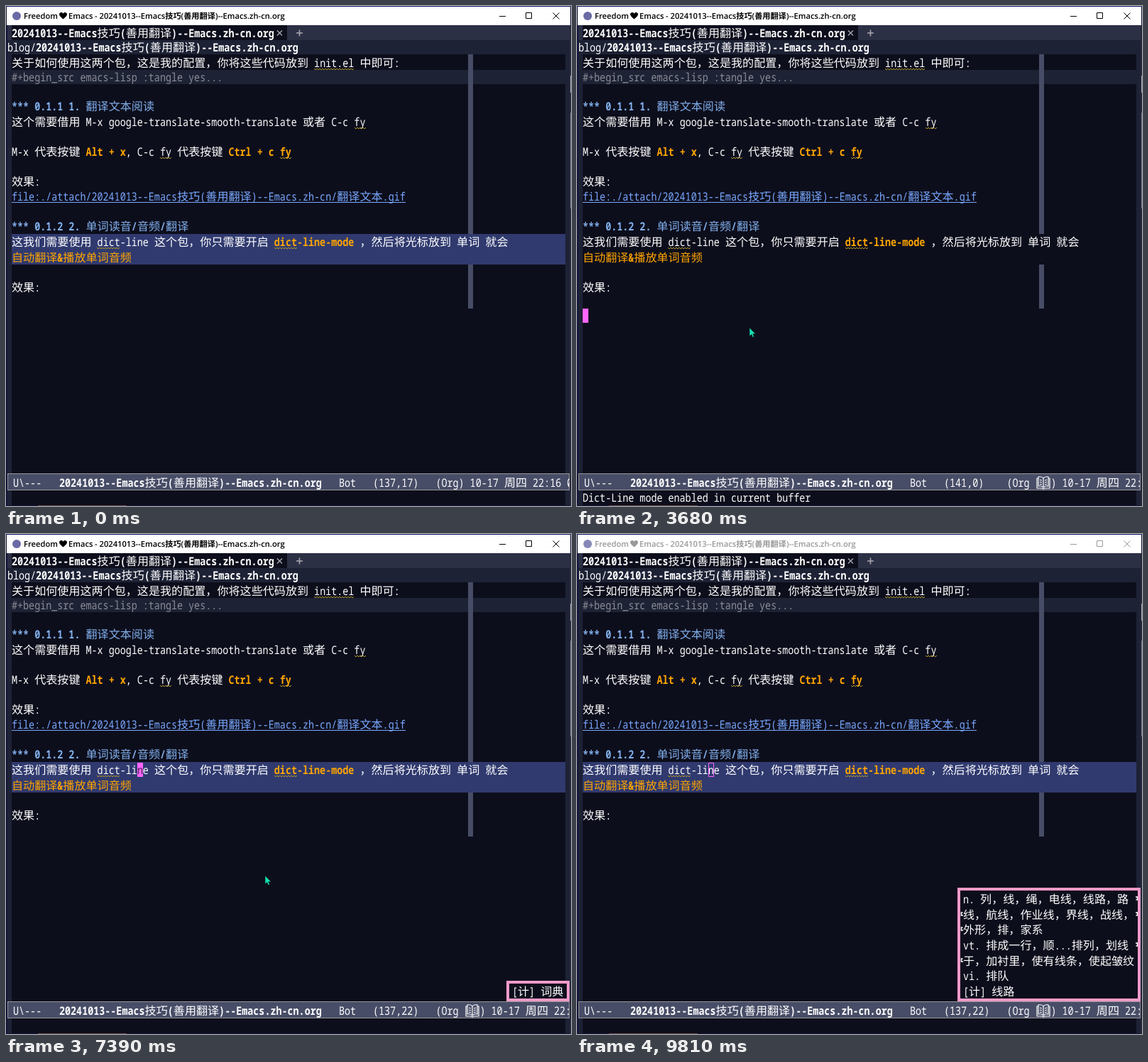
Animation of 796x704 px, one loop 9.84 s. Source, as an HTML page:

```html
<!DOCTYPE html>
<html lang="zh-CN">
<head>
<meta charset="utf-8">
<title>Emacs dict-line</title>
<style>
html, body { margin: 0; width: 100%; height: 100%; overflow: hidden; background: #0d0e1c; }
svg { display: block; }
text { white-space: pre; text-rendering: geometricPrecision; }
.m { font: 13.4px "Noto Sans Mono", "DejaVu Sans Mono", monospace; }
.c { font: 16.08px "Noto Sans CJK SC", "Noto Sans CJK", sans-serif; }
.m.b { font-weight: 700; }
.c.b { font-weight: 500; }
.t { font: 600 11.2px "Open Sans", "Noto Sans CJK SC", "Noto Sans CJK", sans-serif; }
</style>
</head>
<body>
<svg width="796" height="704" viewBox="0 0 796 704">
  <defs>
    <clipPath id="body"><rect x="0" y="0" width="788" height="704"/></clipPath>
    <clipPath id="frame"><rect x="2" y="0" width="792" height="704"/></clipPath>
  </defs>
  <g id="back"></g>
  <g id="live"></g>
  <g id="mouse"></g>
</svg>
<script>
const LOOP = 9840, COL = 8.04, LEFT = 8;
const BG = '#0d0e1c', DIM = '#1d2235', WHITE = '#ffffff', PINK = '#ff66ff', ORANGE = '#ffa500',
  HEAD = '#82b0ec', LINK = '#79a8ff', BAR = '#484d67', NOTE = '#9ac8e0', POP = '#ee9ac8', MINT = '#16e0b4';
const FILE = '20241013--Emacs技巧(善用翻译)--Emacs.zh-cn.org';
const CJK = /[\u3000-\u9fff\uff00-\uffef]+|[^\u3000-\u9fff\uff00-\uffef]+/g;
const $ = id => document.getElementById(id);

const rect = (x, y, x2, y2, fill, more = '') =>
  `<rect x="${x}" y="${y}" width="${x2 - x}" height="${y2 - y}" fill="${fill}" ${more}/>`;
const box = (x, y, x2, y2, stroke, w = 1) =>
  rect(x + w / 2, y + w / 2, x2 - w / 2, y2 - w / 2, 'none', `stroke="${stroke}" stroke-width="${w}"`);
const path = (d, stroke, more = '') => `<path d="${d}" fill="none" stroke="${stroke}" ${more}/>`;
const esc = s => s.replace(/&/g, '&amp;').replace(/</g, '&lt;');

// Text on the terminal grid: wide characters take two columns. y is the row's middle.
function put(x, y, str, color = WHITE, bold = false) {
  let out = '';
  for (const run of str.match(CJK) || []) {
    const wide = /[\u3000-\uffef]/.test(run[0]);
    const cls = (wide ? 'c' : 'm') + (bold ? ' b' : '');
    const place = `translate(${x.toFixed(2)} ${y + 6})` + (wide ? '' : ' scale(1 1.2)');
    out += `<text class="${cls}" fill="${color}" transform="${place}">${esc(run)}</text>`;
    x += run.length * COL * (wide ? 2 : 1);
  }
  return out;
}
const cols = s => [...s].reduce((n, ch) => n + (/[\u3000-\uffef]/.test(ch) ? 2 : 1), 0);
function row(y, ...parts) {
  let x = LEFT, out = '';
  for (const [str, color, bold] of parts) {
    out += put(x, y, str, color, bold);
    x += cols(str) * COL;
  }
  return out;
}
function wave(x, y, n) {
  let d = `M${x} ${y + 8}`;
  for (let i = 1; i <= n * 4; i++) d += `l2 ${i % 2 ? 2 : -2}`;
  return path(d, '#b59a2c', 'stroke-width="1"');
}

function backdrop() {
  let s = rect(0, 0, 796, 704, '#12143a') + rect(2, 27, 794, 703, BG);
  s += rect(794, 27, 796, 704, '#23263c') + rect(795, 98, 796, 122, '#a8a8b4') + rect(795, 150, 796, 285, '#75788c');
  s += rect(45, 703, 170, 704, '#6e4a50') + rect(0, 0, 796, 1, '#101c66') + rect(1, 1, 795, 27, WHITE);
  s += rect(2, 27, 794, 48, '#2c3045') + rect(8, 27, 396, 48, BG) + rect(2, 48, 794, 68, DIM);
  s += put(8, 38, FILE, WHITE, true);
  s += path('M382 34.5l7 7m0-7l-7 7', '#a8a8b0', 'stroke-width="1.4"') + path('M409 38h9m-4.500-4.500v9', '#a8a8b0', 'stroke-width="1.6"');
  s += put(2, 58, 'blog/') + put(42, 58, FILE, WHITE, true);
  s += rect(2, 68, 8, 703, DIM) + rect(788, 68, 794, 703, DIM) + rect(8, 90, 788, 110, DIM);
  s += rect(651, 68, 658, 321, BAR) + rect(651, 364, 658, 426, BAR);
  return s;
}

function buffer() {
  return row(80, ['关于如何使用这两个包，这是我的配置，你将这些代码放到 init.el 中即可:'])
    + row(100, ['#+begin_src emacs-lisp :tangle yes...', '#8c8c94'])
    + row(141, ['*** 0.1.1 1. 翻译文本阅读', HEAD, true])
    + row(163, ['这个需要借用 M-x google-translate-smooth-translate 或者 C-c fy'])
    + row(205, ['M-x 代表按键 '], ['Alt + x', ORANGE, true], [', C-c fy 代表按键 '], ['Ctrl + c fy', ORANGE, true])
    + row(247, ['效果:'])
    + row(268, ['file:./attach/20241013--Emacs技巧(善用翻译)--Emacs.zh-cn/翻译文本.gif', LINK])
    + rect(8, 276, 563, 277, LINK)
    + row(310, ['*** 0.1.2 2. 单词读音/音频/翻译', HEAD, true])
    + row(332, ['这我们需要使用 dict-line 这个包，你只需要开启 '], ['dict-line-mode', ORANGE, true], [' ，然后将光标放到 单词 就会'])
    + row(354, ['自动翻译&播放单词音频', ORANGE, true])
    + row(396, ['效果:'])
    + wave(434, 80, 7) + wave(491, 163, 2) + wave(217, 205, 2) + wave(386, 205, 2) + wave(128, 332, 4) + wave(378, 332, 4);
}

function titleBar(active, name) {
  const ink = active ? '#000000' : '#999999';
  const word = (x, str) => `<text class="t" x="${x}" y="18" fill="${ink}">${str}</text>`;
  return `<circle cx="15" cy="14" r="6" fill="#6a6aa6" opacity="${active ? 1 : .8}"/>`
    + word(25, 'Freedom') + word(88, 'Emacs') + word(125, '- ' + name)
    + `<path d="M80.500 18.500C77 15.500 75 14 75 11.800C75 8.500 79.500 8 80.500 10.800C81.500 8 86 8.500 86 11.800C86 14 84 15.500 80.500 18.500Z" fill="${ink}"/>`
    + path('M695 14.500h9M732.500 9.500h8v8h-8zM770.500 9.500l9 9m0-9l-9 9', ink);
}

function modeLine(top, pos, dict, hot) {
  const y = top + 13;
  let s = rect(2, top, 794, top + 24, BAR) + box(2, top, 794, top + 24, '#979797');
  if (hot) s += rect(75, top + 1, 445, top + 23, '#45605e') + box(75, top + 1, 445, top + 23, '#c8d0d0');
  s += put(10, y, 'U\\---') + put(75, y, FILE, WHITE, true) + put(469, y, 'Bot') + put(517, y, pos);
  if (dict) {
    const d = `M648 ${y - 6}h2v-2q5-1 7 2q2-3 7-2v2h2v14h-7l-2 1l-2-1h-7zM650 ${y - 6}v11q5-1 7 2q2-3 7-2v-11M657 ${y - 6}v12M652 ${y - 4}l3 1m-3 2l3 1m-3 2l3 1m4-6l3-1m-3 4l3-1m-3 4l3-1`;
    s += put(605.400, y, '(Org') + path(d, WHITE, 'stroke-width="1.2"') + put(667.500, y, ') 10-17 周四 22:16');
  } else s += put(605.400, y, '(Org) 10-17 周四 22:16 0');
  return `<g clip-path="url(#frame)">${s}</g>`;
}

const COMMANDS = [
  ['dict-line-mode', 'Minor mode to look up words under the cursor '],
  ['org-hugo-export-to-md', 'Export current buffer to a Hugo-compatible Markdown'],
  ['google-translate-smooth-translate', 'Translate a text using translation directions.'],
  ['org-cliplink', 'Takes a URL from the clipboard and inserts an org'],
  ['gnus', 'Read network news.'],
  ['list-processes', 'Display a list of all processes that are Emacs'],
  ['delete-process', 'Delete PROCESS: kill it and forget about it imm'],
  ['kill-process', 'Kill process PROCESS.  May be process or name of'],
  ['eval-buffer', 'Execute the accessible portion of current buffer'],
  ['scratch-buffer', 'Switch to the *scratch* buffer.']
];
function minibuffer() {
  let s = rect(8, 482, 788, 703, BG) + rect(2, 482, 8, 703, DIM) + rect(788, 482, 794, 703, DIM);
  s += put(LEFT, 491, '1/8047 M-x', '#79c2cc') + rect(8, 501, 788, 521, '#483d8a');
  let marks = '';
  COMMANDS.forEach(([name, note], i) => {
    const y = Math.round(511 + i * 20.1);
    s += put(LEFT, y, name, WHITE, !i) + put(426, y, note, NOTE, !i);
    if (i === 2) s += put(LEFT + 34 * COL, y, '(C-c f y)', '#aebcff', true);
    if (note.length > 44) marks += path(`M789 ${y}h5m-2.500-2.500l2.500 2.500l-2.500 2.500`, WHITE, 'stroke-width="1.4"');
  });
  return `<g clip-path="url(#body)">${s}</g>` + rect(788, 482, 794, 703, DIM) + marks;
}

const SENSES = ['n. 列，线，绳，电线，线路，路', '线，航线，作业线，界线，战线，', '外形，排，家系',
  'vt. 排成一行，顺...排列，划线', '于，加衬里，使有线条，使起皱纹', 'vi. 排队', '[计] 线路'];
function popup(lines) {
  const big = lines.length > 1, x = big ? 536 : 705, top = big ? 498 : 629;
  let s = rect(x, top, 794, 658, BG);
  lines.forEach((line, i) => {
    const y = Math.round(644 - (lines.length - 1 - i) * 21.700);
    s += put(x + 8, y, line);
    if (!big) return;
    if ([0, 1, 3].includes(i)) s += path(`M787 ${y - 3}h2.500v4h-2`, WHITE, 'stroke-width="1.5"');
    if ([1, 2, 4].includes(i)) s += path(`M543.500 ${y - 3}h-2v4h2.500`, WHITE, 'stroke-width="1.5"');
  });
  return s + box(x, top, 794, 658, POP, 4);
}

function cursor(col, y, ch, solid) {
  const x = Math.round(LEFT + col * COL);
  return solid ? rect(x, y, x + 8, y + 20, PINK) + (ch ? put(LEFT + col * COL, y + 10, ch, '#4a2050') : '')
    : box(x, y, x + 8, y + 20, PINK);
}

const BLINKS = [[0, 130], [2400, 2580], [3300, 3520], [4170, 4370], [5640, 5840], [6340, 6540],
  [7510, 7710], [8160, 8360], [8650, 8850], [9340, 9540]];
const within = (t, a, b) => t >= a && t < b;

function scene(t) {
  const active = !within(t, 130, 1810) && t < 9810;
  const on = !BLINKS.some(([a, b]) => within(t, a, b));
  const asking = within(t, 2810, 3520), dict = t >= 3680;
  const atEnd = within(t, 1870, 5140);
  const col = t < 1870 ? 17 : t < 7010 ? 16 : 22;
  const pos = atEnd ? '(141,0) ' : `(137,${col})`;
  let s = titleBar(active, asking ? ' *Minibuf-1*' : FILE);
  if (!atEnd) s += rect(8, 321, 788, 364, '#303a6f');
  s += buffer();
  if (asking) s += cursor(0, 426, '', false);
  else if (on) s += atEnd ? cursor(0, 426, '', active) : cursor(col, 322, { 16: 'i', 17: 'c', 22: 'n' }[col], active);
  s += modeLine(asking ? 458 : 658, pos, dict, asking);
  if (asking) s += minibuffer() + (on ? cursor(11, 481, '', true) : '');
  if (within(t, 3680, 7010)) s += put(LEFT, 692, 'Dict-Line mode enabled in current buffer');
  if (within(t, 6140, 7980)) s += popup(['[计] 词典']);
  if (t >= 7980) s += popup(SENSES);
  return s;
}

// Pointer stops: time, x, y
const STOPS = [[130, 668, 704], [560, 242, 453], [739, 242, 453], [740, 243, 453], [4370, 243, 453], [4820, 163, 329],
  [5110, 142, 331], [5290, 207, 387], [6010, 207, 387], [6800, 189, 331], [7010, 189, 331], [7390, 365, 481],
  [7950, 560, 470], [8760, 514, 485], [8990, 520, 498], [9340, 664, 706]];
function pointer(t) {
  const i = STOPS.findIndex(p => p[0] > t);
  if (i < 1) return '';
  const [a, ax, ay] = STOPS[i - 1], [b, bx, by] = STOPS[i];
  const k = (t - a) / (b - a), e = k * k * (3 - 2 * k);
  const x = Math.round(ax + (bx - ax) * e), y = Math.round(ay + (by - ay) * e);
  const at = `<g transform="translate(${x} ${y})">`;
  if (within(t, 2810, 3520))
    return at + '<path d="M-2 1.500Q-2 0 -.5 0Q1 0 1 1.500V6Q2 5 3.500 6.200Q5 5.500 5.800 7Q7.500 6.800 7.500 8.500V11L6 15H-1.500L-5 10Q-4.500 8 -2 10Z" fill="#fff" stroke="#000" stroke-width=".9"/></g>';
  if (y > 321 && y < 364 && x < 708)
    return at + path('M-3 -7.500h2.500l.5.500l.5-.500h2.500M0 -7v13M-3 6.500h2.500l.5-.500l.5.500h2.500', MINT) + '</g>';
  return at + `<path d="M0 0V12L2.800 9.500L4.600 13.500L6.500 12.600L4.800 8.700H8.500Z" fill="${MINT}" stroke="#06140f" stroke-width=".6"/></g>`;
}

$('back').innerHTML = backdrop();
const shown = {};
function show(id, markup) {
  if (shown[id] === markup) return;
  shown[id] = markup;
  $(id).innerHTML = markup;
}
function draw() {
  const t = performance.now() % LOOP;
  show('live', scene(t));
  show('mouse', pointer(t));
  requestAnimationFrame(draw);
}
draw();
</script>
</body>
</html>
```
